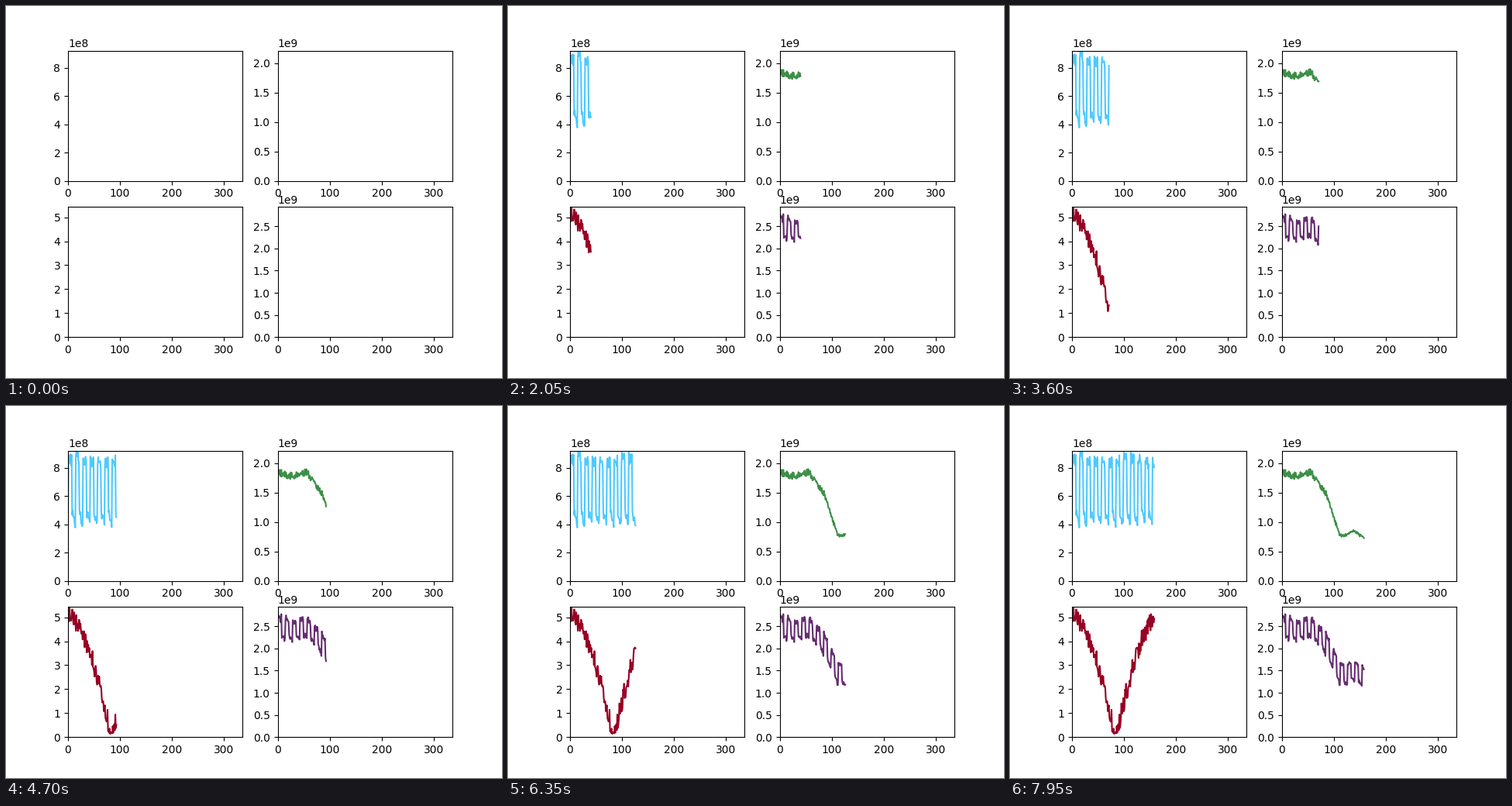
A matplotlib script that plays this animation: 640 px wide and 480 px high, repeating every 8 s.

```python
import numpy as np
import matplotlib.pyplot as plt
from matplotlib.animation import FuncAnimation

STEPS = 160
SPAN = 336
CYCLE = 14
rng = np.random.default_rng(7)
t = np.arange(STEPS)


def noise(size):
    return rng.uniform(-size, size, STEPS)


def switching():
    """Half of each cycle high with a slow swell, half low and sinking."""
    phase = (t - 1) % CYCLE
    high = 8.5 + 0.2 * np.cos(2 * np.pi * (t - 20) / 90) + noise(0.45)
    low = 4.8 - 0.12 * (phase - CYCLE / 2) + noise(0.35)
    return np.where(phase < CYCLE / 2, high, low)


def falling():
    """Flat, then a long fall to a lower level, with proportional noise."""
    x = [0, 25, 57, 70, 85, 112, 126, 138, 158]
    y = [1.84, 1.78, 1.84, 1.66, 1.48, 0.77, 0.78, 0.85, 0.73]
    return np.interp(t, x, y) * (1 + noise(0.035))


def bouncing():
    return np.abs(5 * np.cos(2 * np.pi * t / SPAN) + noise(0.43))


load = switching() * 1e8
base = falling() * 1e9
plots = [
    (load, 9.21e8, "#4dc9ff"),
    (base, 2.21e9, "#3d8f47"),
    (bouncing(), 5.435, "#960024"),
    (load + base, 2.94e9, "#662c70"),
]

fig, axes = plt.subplots(2, 2, figsize=(6.4, 4.8), dpi=100)
lines = []
for ax, (_, top, color) in zip(axes.flat, plots):
    ax.set_xlim(0, SPAN)
    ax.set_ylim(0, top)
    lines += ax.plot([], [], color=color)


def draw(n):
    for line, (series, _, _) in zip(lines, plots):
        line.set_data(t[:n], series[:n])
    return lines


anim = FuncAnimation(fig, draw, frames=STEPS, interval=50, repeat=True,
                     repeat_delay=0, init_func=lambda: draw(0))
plt.show()
```
